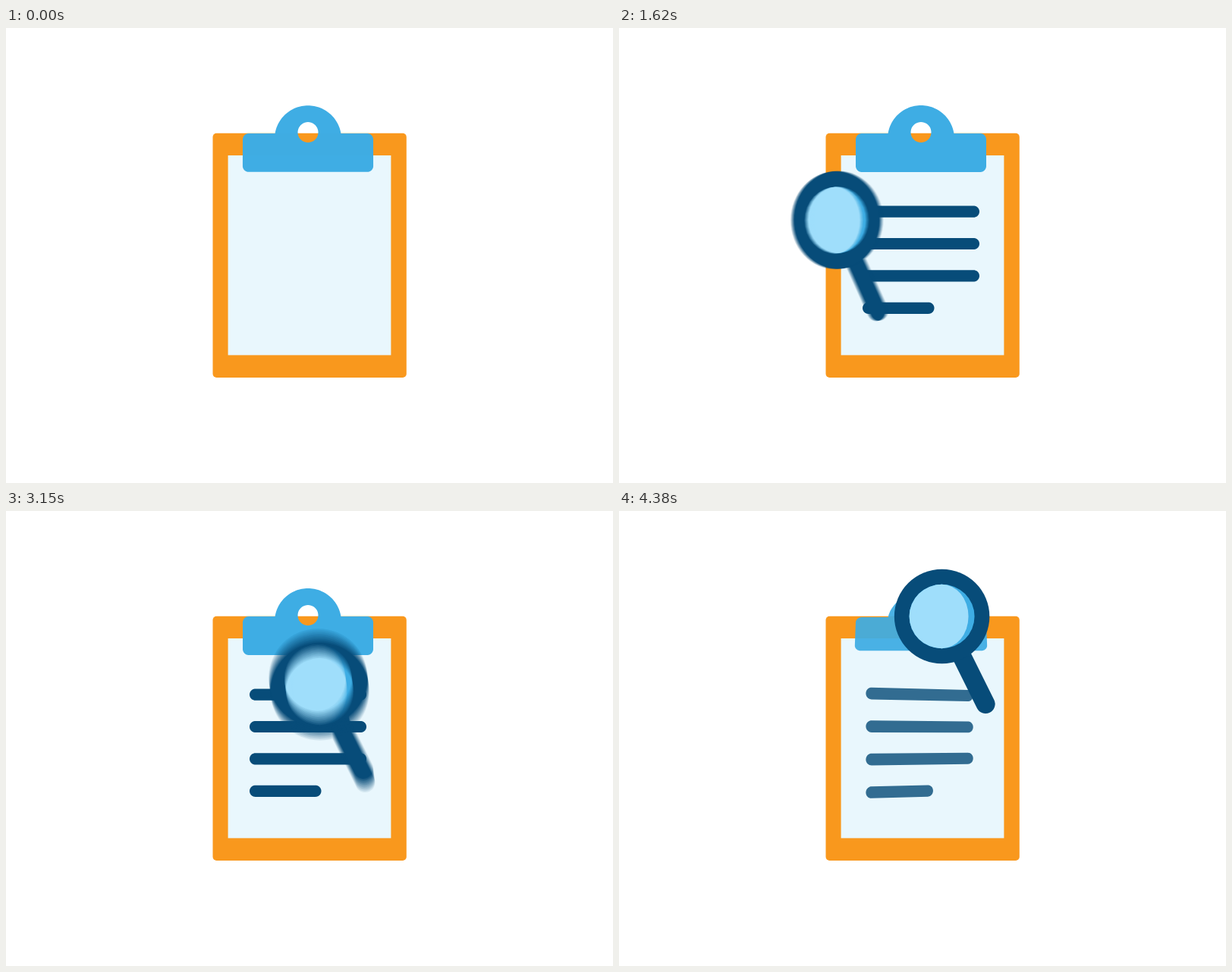
These frames come from a looping animation (800x600 px, 4.41 s). An HTML page with a canvas:

```html
<!DOCTYPE html>
<html lang="en">
<head>
<meta charset="utf-8">
<title>Clipboard search</title>
<style>
html, body { margin: 0; width: 100%; height: 100%; overflow: hidden; background: #fff; }
canvas { display: block; }
</style>
</head>
<body>
<canvas id="stage" width="800" height="600"></canvas>
<script>
const W = 800, H = 600, LOOP = 4410, STEP = 30, DEPTH = 1111, BLUR_SAMPLES = 12;
const NAVY = '#074c79', ORANGE = '#f9981d', PAPER = '#e9f7fd', BLUE = '#3eade4', GLASS = '#9fdefb';
const { PI, sin, cos } = Math;

const makeContext = () => Object.assign(document.createElement('canvas'), { width: W, height: H }).getContext('2d');
const main = document.getElementById('stage').getContext('2d');
const back = makeContext();
const work = makeContext();

const clamp = v => Math.min(1, Math.max(0, v));
const progress = (t, from, to) => clamp((t - from) / (to - from));

// Turning points of the magnifier as [time, position], joined by sine easing
const SWING_X = [[975, 486], [1737, 275], [2600, 398], [2850, 398], [3660, 446], [LOOP, 425.5]];
const SWING_Y = [[960, 225], [1400, 253], [1600, 253], [2010, 300], [2820, 82], [3440, 349], [4320, 139]];

function swing(points, t) {
  let value = points[0][1];
  for (let i = 1; i < points.length; i++) {
    const u = progress(t, points[i - 1][0], points[i][0]);
    value += (points[i][1] - points[i - 1][1]) * (1 - cos(PI * u)) / 2;
  }
  return value;
}

function arc(x, y, r, from, to, n = 24) {
  return Array.from({ length: n + 1 }, (_, i) => {
    const a = from + (to - from) * i / n;
    return [x + r * cos(a), y + r * sin(a)];
  });
}

const capsule = (x1, x2, y, r) => [...arc(x1 + r, y, r, PI / 2, PI * 1.5), ...arc(x2 - r, y, r, -PI / 2, PI / 2)];

const LINES = [475, 475, 475, 415.5].map((end, i) => capsule(321, end, 242.1 + 42.4 * i, 7.6));
const dip = Math.asin(7 / 44);
const CLIP = [
  [
    ...arc(320, 147, 8, PI, PI * 1.5),
    ...arc(398, 146, 44, PI + dip, 2 * PI - dip, 60),
    ...arc(476, 147, 8, -PI / 2, 0),
    ...arc(476, 182, 8, 0, PI / 2),
    ...arc(320, 182, 8, PI / 2, PI)
  ],
  arc(398, 137.5, 13.5, 0, 2 * PI, 40)
];

function project(x, y, z) {
  const s = DEPTH / (DEPTH - z);
  return [W / 2 + (x - W / 2) * s, H / 2 + (y - H / 2) * s];
}
const turnX = a => ([x, y]) => project(x, 146 + (y - 146) * cos(a), (y - 146) * sin(a));
const turnY = a => ([x, y]) => project(398 + (x - 398) * cos(a), y, (398 - x) * sin(a));

function fillShapes(c, shapes, turn, color, alpha) {
  c.globalAlpha = alpha;
  c.fillStyle = color;
  c.beginPath();
  for (const shape of shapes) {
    shape.map(turn).forEach(([x, y], i) => i ? c.lineTo(x, y) : c.moveTo(x, y));
    c.closePath();
  }
  c.fill('evenodd');
  c.globalAlpha = 1;
}

function drawBoard(c, t) {
  c.fillStyle = '#fff';
  c.fillRect(0, 0, W, H);
  c.fillStyle = ORANGE;
  c.beginPath();
  c.roundRect(272.5, 138.7, 255.3, 322.3, 5);
  c.fill();
  c.fillStyle = PAPER;
  c.fillRect(292.6, 168, 214.8, 263.4);

  const clipOut = Math.max(0, (300 - t) / 1170, (t - 3210) / 1170);
  fillShapes(c, CLIP, turnX(24 * clipOut ** 2 * PI / 180), BLUE, 1 - .07 * clipOut ** 1.5);

  const linesOut = clamp(Math.max((1200 - t) / 750, (t - 3900) / 750));
  if (linesOut < 1) fillShapes(c, LINES, turnY(linesOut ** 3 * PI / 2), NAVY, 1 - .3 * linesOut);
}

function disc(c, rx, ry, from, to, color) {
  c.fillStyle = color;
  c.beginPath();
  c.ellipse(0, 0, rx, ry, 0, from, to);
  c.fill();
}

function drawMagnifier(c, t) {
  const grow = 1 - (1 - progress(t, 630, 930)) ** 3;
  const lift = Math.min(progress(t, 960, 1360), progress(t, 4380, 3880));
  const scale = grow * (1 + .038 * lift);
  const squash = 1 - .1 * sin(PI * progress(t, 1350, 1950));
  c.save();
  c.globalAlpha = grow;
  c.translate(swing(SWING_X, t), swing(SWING_Y, t));
  c.scale(scale * squash, scale);
  c.strokeStyle = NAVY;
  c.lineWidth = 25;
  c.lineCap = 'round';
  c.beginPath();
  c.moveTo(24, 48);
  c.lineTo(57.5, 115.5);
  c.stroke();
  disc(c, 62.7, 62.2, 0, 2 * PI, NAVY);
  disc(c, 43, 42.3, 0, 2 * PI, BLUE);
  disc(c, 43, 42.3, PI / 2, PI * 1.5, GLASS);
  disc(c, 35, 42.3, 0, 2 * PI, GLASS);
  c.restore();
}

function render(t) {
  drawBoard(back, t);
  if (t <= 630) {
    main.drawImage(back.canvas, 0, 0);
    return;
  }
  // Motion blur: running average over one exposure
  for (let i = 0; i < BLUR_SAMPLES; i++) {
    work.drawImage(back.canvas, 0, 0);
    drawMagnifier(work, t + ((i + .5) / BLUR_SAMPLES - .5) * STEP);
    main.globalAlpha = 1 / (i + 1);
    main.drawImage(work.canvas, 0, 0);
  }
  main.globalAlpha = 1;
}

const start = performance.now();
let shown = -1;
function tick() {
  const t = Math.floor((performance.now() - start) % LOOP / STEP) * STEP;
  if (t !== shown) render(shown = t);
  requestAnimationFrame(tick);
}
tick();
</script>
</body>
</html>
```
